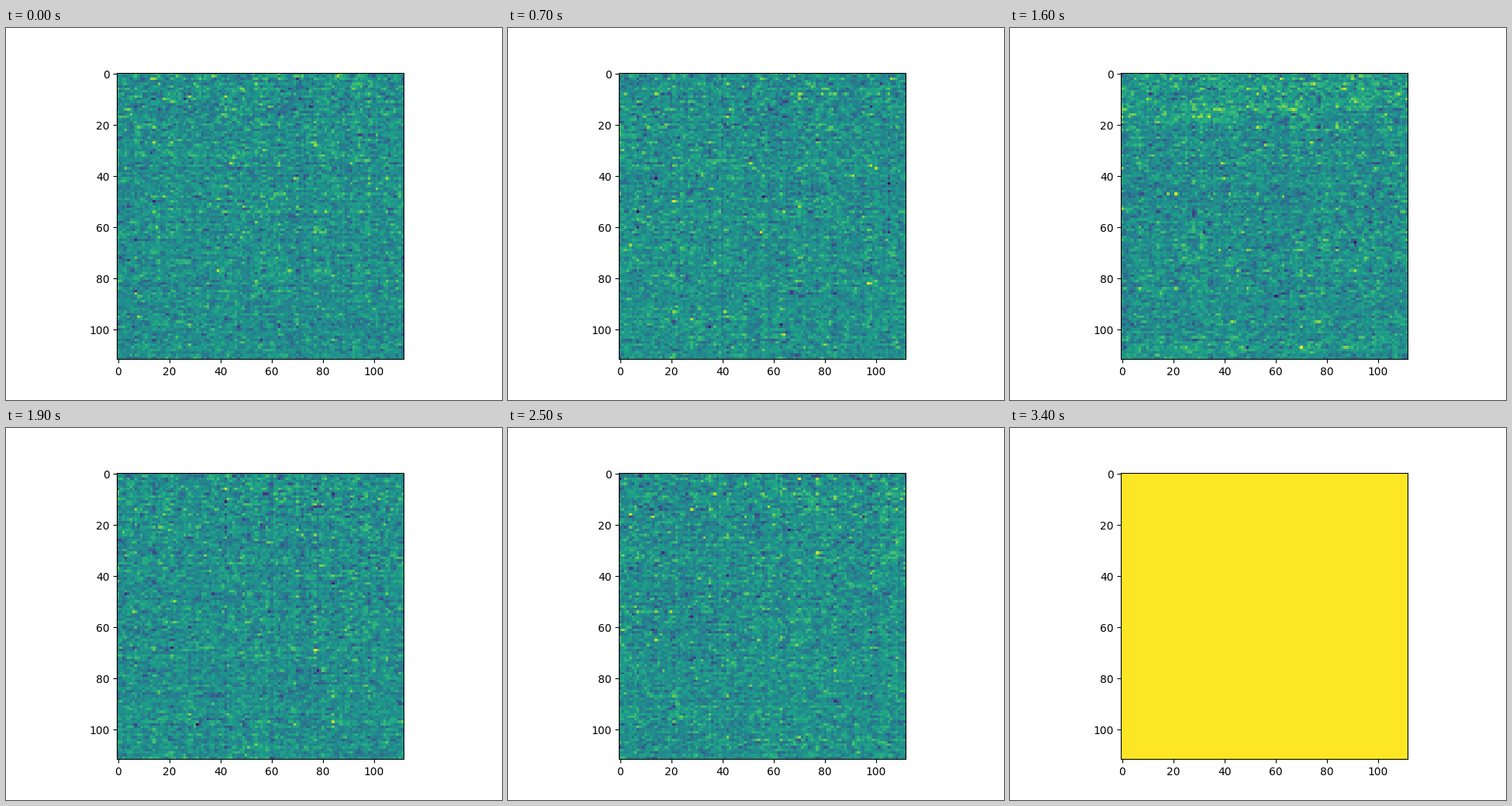
Animation, 640 px wide and 480 px high, one loop 4.9 s. Source, as a matplotlib script:

```python
import numpy as np
import matplotlib.pyplot as plt
from matplotlib.animation import FuncAnimation

N = 112
STEP = 100       # ms
LAST = 34        # first fully saturated step, held to the end of the loop
FRAMES = 49

y, x = np.mgrid[0:N, 0:N]

# Fixed texture: rows differ in strength, every seventh column is rougher
tex = np.random.default_rng(4)
row_gain = tex.uniform(0.7, 1.2, (N, 1))
gain = row_gain * np.where(x % 7 == 0, 1.4, 1.0) * (1 + 0.2 * np.exp(-y / 14))


def noise(i):
    rng = np.random.default_rng(100 + i)
    w = rng.standard_t(12, (N, N + 1))
    cells = 0.92 * w[:, 1:] + 0.35 * w[:, :-1]
    rows = 0.2 * rng.standard_normal((N, 1))
    cols = 0.2 * rng.standard_normal((1, N))
    return 0.078 * (gain * cells + rows + cols)


def band(i):
    """Faint slanted front that flares up for a moment."""
    edge = 21 - 0.115 * x
    patches = np.clip(1 + 0.6 * np.sin(x / 4.5), 0, None)
    ridge = 0.075 * patches * np.exp(-((y - edge) / 2.5) ** 2) * (x > 12)
    above = 0.045 / (1 + np.exp(y - edge))
    return (ridge + above) * np.exp(-((i - 16) / 1.8) ** 2)


def flood(i):
    """Bright front growing exponentially from the upper right."""
    u = x / (N - 1)
    spot = 0.6 * np.exp(-((x - 112) / 27) ** 2 - ((y - 22) / 19) ** 4)
    top = 0.14 * np.sqrt(u) / (1 + np.exp((y - 15) / 2)) * row_gain
    grain = 1 + 0.22 * np.random.default_rng(300 + i).standard_normal((N, N))
    front = 0.36 * u ** 2 * np.clip(grain, 0.4, None)
    return (0.018 + front + spot + top) * 2.5 ** (i - 29)


def field(i):
    if i >= LAST:
        return np.ones((N, N))
    return 0.5 + noise(i) + band(i) + flood(i)


fig, ax = plt.subplots(figsize=(6.4, 4.8), dpi=100)
img = ax.imshow(field(0), cmap="viridis", vmin=0, vmax=1,
                interpolation="nearest")


def update(i):
    img.set_data(field(i))
    return [img]


anim = FuncAnimation(fig, update, frames=FRAMES, interval=STEP,
                     repeat=True, repeat_delay=0, blit=False)
plt.show()
```
